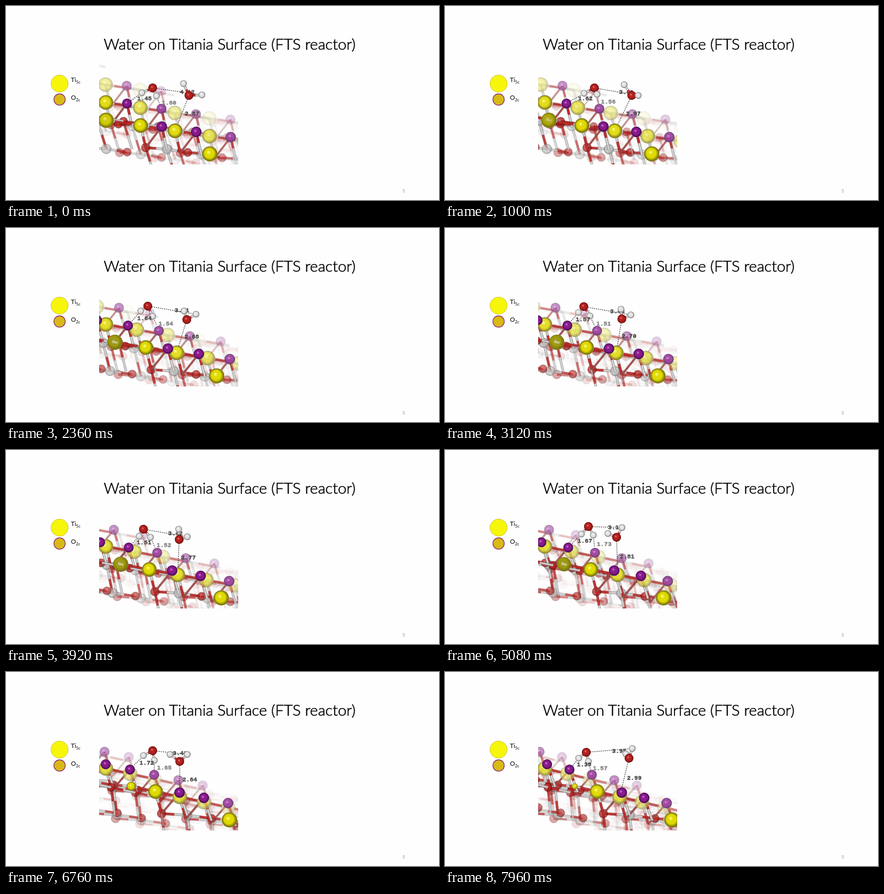
An HTML page with a canvas for the animation above (8000 ms loop, 800x360 px).

```html
<!DOCTYPE html>
<html lang="en">
<head>
<meta charset="utf-8">
<title>Water on Titania Surface</title>
<style>
  html, body { margin: 0; width: 100%; height: 100%; overflow: hidden; background: #fefefe; }
  canvas, svg { position: absolute; left: 0; top: 0; }
  svg { font-family: Lato, sans-serif; }
</style>
</head>
<body>
<canvas id="stage" width="800" height="360"></canvas>
<svg width="800" height="360">
  <text x="180.5" y="81" font-size="28.35" font-weight="300" stroke="#000" stroke-width=".6">Water on Titania Surface (FTS reactor)</text>
  <circle cx="99" cy="144" r="16" fill="#f6f60a" stroke="#c9b83c" stroke-width=".8"/>
  <circle cx="99" cy="173.5" r="10.5" fill="#d8b915" stroke="#8c2f78" stroke-width="1.3"/>
  <text x="120" y="141" font-size="11.5">Ti<tspan font-size="7.5" dy="3">5c</tspan></text>
  <text x="120" y="174" font-size="11.5">O<tspan font-size="7.5" dy="3">2c</tspan></text>
  <text x="732.5" y="346" font-size="8" fill="#888">5</text>
</svg>
<script>
const ctx = document.getElementById('stage').getContext('2d');
const LOOP = 8;
const KEY_TIMES = [0, 1, 2.36, 3.92, 5.08, 6.76, 7.96];

// Colours of a ball: highlight, body, rim
const SHADES = {
  yellow: ['#ffff96', '#e0da02', '#655f02'],
  purple: ['#d48cd4', '#891a8e', '#3f0846'],
  red: ['#e88f88', '#b5211f', '#64100e'],
  gray: ['#ffffff', '#bdbdbd', '#737373'],
  white: ['#ffffff', '#e2e2e2', '#707070']
};

// Edge and core of a rod
const RODS = {
  red: ['#8f1a1a', '#c9322e'],
  white: ['#8c8c8c', '#e4e4e4'],
  brown: ['#8a3c3a', '#a84c4a']
};

// Surface sublattices: start x, drift of x over the loop, start y
const TI = [184.5, 0, 179], BRIDGE = [223.5, 6.5, 181];
const OX_FRONT = [194, 2, 220], TI_LOW = [233, 12, 223], OX_SIDE = [271.5, 20, 229];
const OX_INNER = [217, -27, 214];

const water = {
  o1: { x: [271, 276, 262, 254, 265, 271, 261], y: [152, 152, 145, 147, 142, 146, 149] },
  h1a: { x: [251, 257, 249, 246, 252, 254, 247], y: [161, 162, 154, 160, 156, 155, 160] },
  h1b: { x: [278, 281, 271, 267, 274, 274, 265], y: [167, 164, 164, 162, 158, 164, 166] },
  o2: { x: [338, 345, 334, 320, 317, 321, 340], y: [166, 166, 170, 166, 162, 166, 160] },
  h2a: { x: [328, 331, 329, 319, 301, 303, 334], y: [144, 146, 154, 147, 155, 153, 152] },
  h2b: { x: [362, 357, 351, 335, 327, 335, 346], y: [165, 166, 160, 161, 144, 153, 142] }
};
const distances = {
  left: [1.45, 1.62, 1.64, 1.51, 1.67, 1.72, 1.39],
  right: [1.60, 1.56, 1.54, 1.52, 1.73, 1.65, 1.57],
  down: [2.87, 2.97, 2.68, 2.77, 2.81, 2.64, 2.99],
  across: [4.12, 3.41, 3.41, 3.42, 3.14, 3.40, 3.95]
};

const clamp = (v, lo, hi) => Math.max(lo, Math.min(hi, v));
const mix = (a, b, s) => ({ x: a.x + (b.x - a.x) * s, y: a.y + (b.y - a.y) * s });

// Smooth curve through the key values
function track(values, t) {
  const last = KEY_TIMES.length - 1;
  let i = 0;
  while (i < last - 1 && t >= KEY_TIMES[i + 1]) i++;
  const slope = j => {
    const a = Math.max(0, j - 1), b = Math.min(last, j + 1);
    return (values[b] - values[a]) / (KEY_TIMES[b] - KEY_TIMES[a]);
  };
  const span = KEY_TIMES[i + 1] - KEY_TIMES[i];
  const s = Math.min(1, (t - KEY_TIMES[i]) / span);
  const blend = s * s * (3 - 2 * s);
  return values[i] * (1 - blend) + values[i + 1] * blend +
    span * s * (1 - s) * (slope(i) * (1 - s) - slope(i + 1) * s);
}

// The slab turns: columns close up while rows shift sideways
function site([x, drift, y], row, col, u) {
  return {
    x: x + drift * u + col * (63.7 - 22.4 * u) + row * (0.5 + 55 * u),
    y: y + 9.8 * col + 33 * row
  };
}

const oneLayerDown = (p, u) => ({ x: p.x + 16 - 11 * u, y: p.y + 52 });

function ball(p, r, shade, alpha = 1, solid = true) {
  if (alpha <= 0.02) return;
  const [light, body, rim] = SHADES[shade];
  const g = ctx.createRadialGradient(p.x - r * .2, p.y - r * .25, 0, p.x, p.y, r);
  g.addColorStop(0, light);
  g.addColorStop(.3, body);
  g.addColorStop(.62, body);
  g.addColorStop(1, rim);
  ctx.beginPath();
  ctx.arc(p.x, p.y, r, 0, 7);
  if (solid) {
    ctx.globalAlpha = alpha;
    ctx.fillStyle = '#fefefe';
    ctx.fill();
  }
  ctx.globalAlpha = alpha;
  ctx.fillStyle = g;
  ctx.fill();
  ctx.globalAlpha = 1;
}

function line(a, b, color, width) {
  ctx.strokeStyle = color;
  ctx.lineWidth = width;
  ctx.beginPath();
  ctx.moveTo(a.x, a.y);
  ctx.lineTo(b.x, b.y);
  ctx.stroke();
}

// Two-tone rod: each half takes the colour of its end
function rod(a, b, first, second, alpha, width = 5) {
  if (alpha <= 0.02) return;
  const mid = mix(a, b, .5);
  ctx.globalAlpha = alpha;
  for (const [p, q, tone] of [[a, mid, first], [mid, b, second]]) {
    line(p, q, RODS[tone][0], width);
    line(p, q, RODS[tone][1], width * .5);
  }
  ctx.globalAlpha = 1;
}

const nearness = (row, col) => 1.03 - .27 * col + .55 * row;
const fog = (row, col) => clamp(nearness(row, col), 0, 1);

// The front row is cut off at the step edge
const inSlab = (row, col) => row < 1 || col >= 1;

function drawLower(row, col, u) {
  const alpha = clamp(nearness(row, col) * 1.2 - .72, .04 * (row + 2), .82);
  const atoms = [[OX_FRONT, 'red', 8.5], [TI_LOW, 'gray', 9.5], [OX_SIDE, 'red', 8]]
    .map(([lattice, shade, r]) => ({ p: site(lattice, row, col, u), shade, r }));
  const [front, low, side] = atoms.map(atom => atom.p);
  const [deepFront, deepLow, deepSide] = [front, low, side].map(p => oneLayerDown(p, u));
  rod(deepFront, deepLow, 'red', 'white', alpha * .7);
  rod(deepLow, deepSide, 'white', 'red', alpha * .7);
  rod(front, deepFront, 'red', 'white', alpha * .9);
  rod(low, deepLow, 'white', 'red', alpha * .9);
  for (const { p, shade, r } of atoms) ball(oneLayerDown(p, u), r, shade, alpha * .75, false);
  rod(front, low, 'red', 'white', alpha);
  rod(low, side, 'white', 'red', alpha);
  rod(side, site(TI, row + 1, col + 2, u), 'red', 'white', alpha * .8);
  for (const { p, shade, r } of atoms.reverse()) ball(p, r, shade, alpha * .9, false);
}

function drawInnerChain(u) {
  for (let col = 4; col >= -1; col--) {
    const p = site(OX_INNER, 0, col, u), alpha = clamp(.8 - .2 * col, 0, .8);
    rod(p, site(OX_INNER, 0, col + 1, u), 'red', 'white', alpha);
    rod(p, oneLayerDown(p, u), 'red', 'white', alpha * .8);
    ball(p, 8, 'red', alpha, false);
  }
}

function drawUpperRods(row, col, u) {
  const alpha = fog(row, col);
  const ti = site(TI, row, col, u), next = site(TI, row, col + 1, u);
  const middle = mix(ti, next, .5);
  if (row < 1 || col >= 0) {
    rod(ti, middle, 'white', 'red', alpha * .75);
    rod(middle, next, 'red', 'white', alpha * .75);
  }
  if (inSlab(row, col)) {
    const bridge = site(BRIDGE, row, col, u), front = site(OX_FRONT, row, col, u);
    rod(ti, front, 'white', 'red', alpha * .85);
    rod(bridge, front, 'brown', 'brown', alpha * .8, 4);
    rod(bridge, site(TI_LOW, row, col, u), 'red', 'white', alpha * .9);
  }
}

// The nearest titanium is sliced open by the camera plane, then shrinks
function drawSlicedBall(p, u) {
  const r = Math.min(14, 14 - (u - .6) * 22);
  ball(p, r, 'yellow');
  const shade = .5 * clamp(u * 6, .25, 1) * clamp((.8 - u) * 6, 0, 1);
  ctx.globalAlpha = shade;
  ctx.fillStyle = '#5c5826';
  ctx.beginPath();
  ctx.arc(p.x, p.y, r * .82, 0, 7);
  ctx.fill();
  ctx.globalAlpha = shade * 1.4;
  line({ x: p.x - 5, y: p.y - 1 }, { x: p.x + 5, y: p.y + 1 }, '#d8d5b0', 4);
  ctx.globalAlpha = 1;
}

function drawSurface(u) {
  for (let row = -2; row <= 1; row++) {
    const eachCol = paint => { for (let col = 5; col >= -3; col--) paint(col); };
    eachCol(col => { if (inSlab(row, col)) drawLower(row, col, u); });
    if (row === 1) drawInnerChain(u);
    eachCol(col => drawUpperRods(row, col, u));
    eachCol(col => {
      const ti = site(TI, row, col, u);
      if (row === 1 && col === 0) drawSlicedBall(ti, u);
      else if (inSlab(row, col)) ball(ti, 13.5, 'yellow', clamp(nearness(row, col) - .1 - .25 * u, 0, 1));
    });
    eachCol(col => {
      if (inSlab(row, col)) ball(site(BRIDGE, row, col, u), row > 0 ? 9.8 : 9.2, 'purple', fog(row, col));
    });
  }
  ball(site(TI, 2, 3, u), 14, 'yellow');
}

function dotted(a, b) {
  ctx.setLineDash([2, 1.8]);
  line(a, b, '#484848', 1.4);
  ctx.setLineDash([]);
}

function label(a, b, value, color) {
  const { x, y } = mix(a, b, .5), text = value.toFixed(2);
  ctx.fillStyle = ctx.strokeStyle = color;
  ctx.lineWidth = .4;
  ctx.fillText(text, x + 5, y + 4);
  ctx.strokeText(text, x + 5, y + 4);
}

function drawWater(t, u) {
  const p = {};
  for (const name in water) p[name] = { x: track(water[name].x, t), y: track(water[name].y, t) };
  const gap = name => track(distances[name], t);
  const ti = site(TI, 1, 2, u);
  const bridges = [site(BRIDGE, 0, 0, u), site(BRIDGE, 0, 1, u)];
  ctx.font = 'bold 11.3px "Liberation Mono", monospace';

  dotted(p.h1a, mix(p.h1a, bridges[0], .75));
  dotted(p.h1b, mix(p.h1b, bridges[1], .65));
  dotted(p.o2, mix(p.o2, ti, .8));
  dotted(p.o1, p.h2b);
  label(p.o1, p.h2b, gap('across'), '#484848');

  for (const [o, h] of [['o1', 'h1a'], ['o1', 'h1b'], ['o2', 'h2a'], ['o2', 'h2b']]) {
    rod(p[o], p[h], 'red', 'white', 1, 4.5);
  }
  ball(p.h2a, 6.2, 'white');
  ball(p.o1, 8.2, 'red');
  ball(p.o2, 8.2, 'red');
  for (const h of ['h1a', 'h1b', 'h2b']) ball(p[h], 6.2, 'white');

  label(p.h1a, bridges[0], gap('left'), '#484848');
  label(p.h1b, bridges[1], gap('right'), '#808080');
  label(p.o2, ti, gap('down'), '#484848');
}

function draw() {
  const t = performance.now() / 1000 % LOOP, u = t / LOOP;
  ctx.clearRect(0, 0, 800, 360);
  ctx.save();
  ctx.beginPath();
  ctx.rect(172, 92, 257, 202);
  ctx.clip();
  drawSurface(u);
  drawWater(t, u);
  ctx.restore();
  requestAnimationFrame(draw);
}
draw();
</script>
</body>
</html>
```
